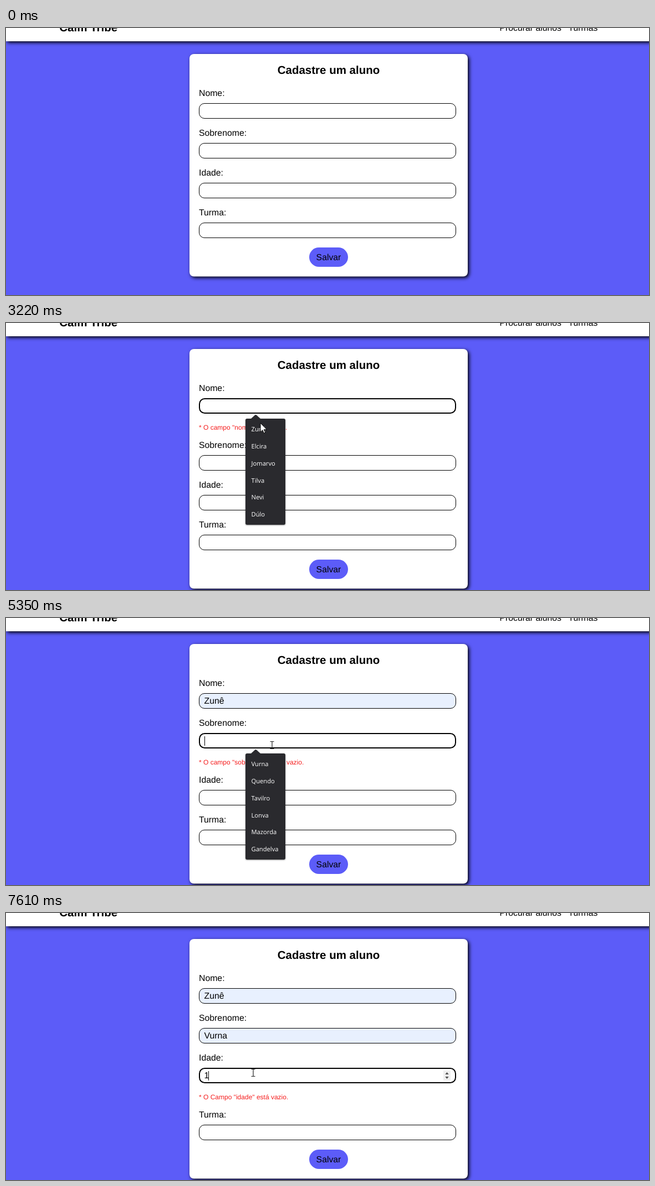
An HTML page that plays this animation: 1160 by 483 pixels, repeating every 8 s.

```html
<!DOCTYPE html>
<html lang="pt-BR">
<head>
<meta charset="utf-8">
<title>Cadastre um aluno</title>
<style>
  html, body { margin: 0; width: 100%; height: 100%; overflow: hidden; background: #5c5cf8; }
  svg { display: block; width: 1160px; height: 483px; }
  text { font: 15.8px "Liberation Sans", Arial, sans-serif; fill: #000; text-rendering: geometricPrecision; }
  .bold { font-size: 20.5px; font-weight: bold; }
  .error { font-size: 12px; fill: #f51d1d; }
  .option { font: 11.2px "Open Sans", "Noto Sans", sans-serif; fill: #fff; }
  .mid { text-anchor: middle; }
</style>
</head>
<body>
<svg id="stage" viewBox="0 0 1160 483">
  <defs>
    <filter id="shadow" filterUnits="userSpaceOnUse" x="-30" y="-40" width="1260" height="560" color-interpolation-filters="sRGB">
      <feDropShadow dx="2.5" dy="2.5" stdDeviation="3" flood-color="#000"/>
    </filter>
    <filter id="soft" x="-20%" y="-10%" width="140%" height="120%">
      <feDropShadow dx="0" dy="1" stdDeviation="1.2" flood-color="#000" flood-opacity=".4"/>
    </filter>
  </defs>
  <rect width="1160" height="483" fill="#5c5cf8"/>
  <rect y="-36" width="1200" height="60" fill="#fff" filter="url(#shadow)"/>
  <text class="bold" x="96.3" y="6">Calm Tribe</text>
  <text x="890.5" y="5">Procurar alunos</text>
  <text x="1014.5" y="5">Turmas</text>
</svg>
<script>
const LOOP = 8000, ENTER = 440, GAP = 72, SHIFT = 31, ROW = 30.85, BLINK = 500;
const stage = document.getElementById('stage');

function set(node, attrs) {
  for (const k in attrs) node.setAttribute(k, attrs[k]);
  return node;
}
function add(tag, attrs, parent = stage, text = '') {
  const node = set(document.createElementNS('http://www.w3.org/2000/svg', tag), attrs);
  node.textContent = text;
  return parent.appendChild(node);
}
const show = (node, on) => node.setAttribute('visibility', on ? 'visible' : 'hidden');
const move = (node, x, y) => node.setAttribute('transform', `translate(${x} ${y})`);
const clamp = v => Math.max(0, Math.min(1, v));
const ease = v => v * v * (3 - 2 * v);

// Each press of the button reports the next empty field
const presses = [1410, 4650, 6730];
const fields = [
  { label: 'Nome', error: '* O campo "nome" está vazio.', value: 'Zunê',
    focus: 2290, preview: 3285, pick: 3500, names: ['Zunê', 'Elcira', 'Jomarvo', 'Tilva', 'Nevi', 'Dúlo'] },
  { label: 'Sobrenome', error: '* O campo "sobrenome" está vazio.', value: 'Vurna',
    focus: 5140, preview: 5600, pick: 5740, names: ['Vurna', 'Quendo', 'Tavilro', 'Lonva', 'Mazorda', 'Gandelva'] },
  { label: 'Idade', error: '* O Campo "idade" está vazio.', value: '1', focus: 7300, preview: 7610, pick: 7610 },
  { label: 'Turma', value: '', focus: LOOP, preview: LOOP, pick: LOOP }
];

const card = add('rect', { x: 331, y: 47, width: 502, rx: 8, fill: '#fff', filter: 'url(#shadow)' });
add('text', { x: 582, y: 83, class: 'bold mid' }, stage, 'Cadastre um aluno');

function addField(f) {
  f.g = add('g', {});
  add('text', { x: 348, y: 123 }, f.g, f.label + ':');
  f.box = add('rect', {}, f.g);
  f.text = add('text', { x: 357.5, y: 155 }, f.g, f.value);
  f.caret = add('rect', { y: 142, width: 1, height: 17 }, f.g);
  f.end = Math.round(357.5 + f.text.getComputedTextLength()) - 1;
  if (f.label === 'Idade') {
    f.spin = add('g', {}, f.g);
    add('rect', { x: 789, y: 141, width: 13, height: 18, fill: '#efefef' }, f.spin);
    add('path', { d: 'M792.3 148h6.4l-3.2-4zM792.3 152h6.4l-3.2 4z', fill: '#505050' }, f.spin);
  }
}
function addList(f, i) {
  f.list = add('g', { transform: `translate(0 ${i * GAP})` });
  const panel = add('g', { filter: 'url(#soft)', fill: '#292a2d' }, f.list);
  add('rect', { x: 432, y: 173, width: 72, height: 192, rx: 3 }, panel);
  add('path', { d: 'M441 174l8-7.3q1.5-1.2 3 0l8 7.3z' }, panel);
  f.row = add('rect', { x: 432, y: 177, width: 72, height: 30, fill: '#46474a' }, f.list);
  f.names.forEach((name, k) => add('text', { x: 442.5, y: 196 + k * ROW, class: 'option' }, f.list, name));
}

fields.forEach(addField);
const error = add('text', { x: 348, class: 'error' });
const button = add('g', {});
const pill = add('rect', { x: 547, y: 397, width: 70, height: 35, rx: 17.5 }, button);
add('text', { x: 582, y: 420, class: 'mid' }, button, 'Salvar');
const lists = fields.filter(f => f.names);
lists.forEach(addList);

// Pointer shapes, hotspot at the origin
const outline = { fill: '#fff', stroke: '#000', 'stroke-linejoin': 'round' };
const cursors = {
  arrow: add('path', { ...outline, d: 'M0 0V16.2L3.8 12.7L6.3 18.3L8.7 17.2L6.3 11.8H11.5Z' }),
  beam: add('path', { d: 'M-3.5-6.5h7M0-6.5v13M-3.5 6.5h7', stroke: '#222', 'stroke-width': 1.2 }),
  hand: add('path', { ...outline, d: 'M-1.5 1.2Q0-1.2 1.5 1.2V6.3Q7 5 9.5 9V13Q9.3 15.5 8 17V19.5H-.2V17.5L-4.6 11.8Q-5.2 9.5-3.3 9.8L-1.5 11.5Z' })
};

// Pointer moves: start, end, x, y
const home = [1035, 452];
const moves = [
  [440, 1210, 598, 401], [1600, 1890, 447, 140], [2090, 2360, 451, 153],
  [3150, 3220, 459, 181], [3500, 4400, 568, 433], [4650, 5070, 480, 230],
  [5410, 5600, 464, 262], [5740, 6170, 557, 438], [6760, 7260, 446, 289]
];
function pointAt(t) {
  return moves.reduce(([px, py], [a, b, x, y]) => {
    const k = ease(clamp((t - a) / (b - a)));
    return [px + (x - px) * k, py + (y - py) * k];
  }, home);
}

function buttonColor(t) {
  const glow = presses.map(p => Math.min(clamp((t - p + 330) / 100), clamp((p + 100 - t) / 100)));
  const k = Math.max(...glow), c = Math.round(92 + 35 * k);
  return `rgb(${c},${c},${Math.round(248 + 4 * k)})`;
}

function render(t) {
  const bad = presses.filter(p => t >= p).length - 1;
  const extra = bad < 0 ? 0 : SHIFT;
  const [px, py] = pointAt(t);
  const inside = (x, y, w, h) => px > x && px < x + w && py > y && py < y + h;
  let shape = 'arrow';

  card.setAttribute('height', 402.5 + extra);
  move(button, 0, extra);
  pill.setAttribute('fill', buttonColor(t));
  show(error, bad >= 0);
  if (bad >= 0) {
    error.textContent = fields[bad].error;
    error.setAttribute('y', 192.5 + GAP * bad);
  }

  fields.forEach((f, i) => {
    const y = GAP * i + (i > bad ? extra : 0);
    const focused = i === bad && t >= f.focus;
    const over = inside(348, 136 + y, 464, 28);
    const filled = t >= f.preview, picked = t >= f.pick;
    const blink = Math.floor((t - (picked ? f.pick : f.focus)) / BLINK) % 2 === 0;
    const w = focused ? 2 : 1;
    move(f.g, 0, y);
    set(f.box, {
      x: 348 + w / 2, y: 136 + w / 2, width: 464 - w, height: 28 - w, rx: 9.5,
      fill: filled && f.names ? '#e8f0fe' : '#fff', stroke: '#000', 'stroke-width': w
    });
    show(f.text, filled);
    f.caret.setAttribute('x', picked ? f.end : 358);
    show(f.caret, focused && blink && filled === picked);
    if (f.spin) show(f.spin, t >= ENTER && (over || focused));
    if (over) shape = 'beam';
  });

  for (const f of lists) {
    const open = t >= f.focus + 70 && t < f.pick;
    f.list.setAttribute('display', open ? 'inline' : 'none');
    show(f.row, t >= f.preview);
    if (open && t >= f.focus + 300) shape = 'arrow';
  }

  if (inside(547, 397 + extra, 70, 35)) shape = 'hand';
  for (const name in cursors) {
    show(cursors[name], t >= ENTER && name === shape);
    move(cursors[name], px, py);
  }
}

const start = performance.now();
function tick() {
  render((performance.now() - start) % LOOP);
  requestAnimationFrame(tick);
}
tick();
</script>
</body>
</html>
```
